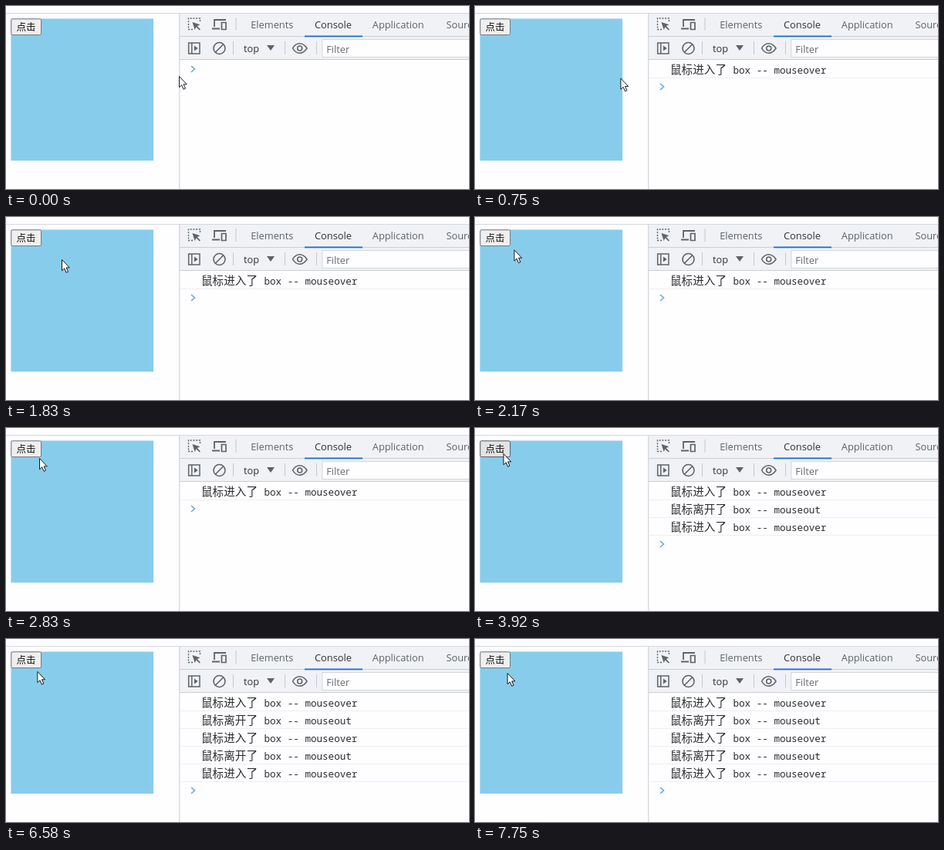
These frames come from a looping animation (600x238 px, 8000 ms). An HTML page with a canvas:

```html
<!DOCTYPE html>
<html lang="zh">
<head>
<meta charset="utf-8">
<title>mouseover</title>
<style>
html, body { margin: 0; width: 100%; height: 100%; overflow: hidden; background: #fefdff; }
canvas { display: block; width: 600px; height: 238px; }
</style>
</head>
<body>
<canvas id="stage"></canvas>
<script>
const W = 600, H = 238, LOOP = 8000, FPS = 12;
const canvas = document.getElementById('stage');
const ctx = canvas.getContext('2d');
const ratio = window.devicePixelRatio || 1;
canvas.width = W * ratio;
canvas.height = H * ratio;
ctx.scale(ratio, ratio);

const UI = '12.8px "Open Sans", "Noto Sans", sans-serif';
const MONO = '12.6px "Noto Sans Mono", "DejaVu Sans Mono", monospace';
const cjk = size => `${size}px "Noto Sans CJK SC", "Noto Sans CJK", sans-serif`;

// Pointer path: tick, x, y
const path = [
  [3, 224, 91], [13, 160, 95], [15, 154, 93], [22, 72, 55], [23, 65, 51],
  [29, 43, 38], [30, 43, 38], [31, 43, 41], [33, 43, 41], [34, 43, 39],
  [39, 36.5, 31], [46, 36.5, 31], [47, 36.5, 33], [75, 36.5, 33],
  [76, 36.5, 34], [80, 41, 43], [92, 41, 43], [93, 41.6, 44]
];
const ENTER_BOX = 9, ENTER_BUTTON = 35, LEAVE_BUTTON = 78;
const over = ['鼠标进入了', 'box -- mouseover'];
const out = ['鼠标离开了', 'box -- mouseout'];
const logs = [
  [ENTER_BOX, over],
  [ENTER_BUTTON, out], [ENTER_BUTTON, over],
  [LEAVE_BUTTON, out], [LEAVE_BUTTON, over]
];

function slope(i, axis) {
  const a = path[i], b = path[i + 1];
  return a && b ? (b[axis] - a[axis]) / (b[0] - a[0]) : 0;
}

// Harmonic mean of the neighbouring slopes keeps the curve monotone
function tangent(i, axis) {
  const a = slope(i - 1, axis), b = slope(i, axis);
  return a * b > 0 ? 2 * a * b / (a + b) : 0;
}

function pointerAt(tick) {
  const last = path.length - 1;
  if (tick <= path[0][0]) return path[0].slice(1);
  if (tick >= path[last][0]) return path[last].slice(1);
  const i = path.findIndex(k => k[0] > tick) - 1;
  const a = path[i], b = path[i + 1], span = b[0] - a[0];
  const s = (tick - a[0]) / span, s2 = s * s, s3 = s2 * s;
  return [1, 2].map(axis =>
    a[axis] + (b[axis] - a[axis]) * (3 * s2 - 2 * s3) +
    span * (tangent(i, axis) * (s3 - 2 * s2 + s) + tangent(i + 1, axis) * (s3 - s2)));
}

function rect(x, y, w, h, color) {
  ctx.fillStyle = color;
  ctx.fillRect(x, y, w, h);
}

function text(str, x, y, font, color) {
  ctx.font = font;
  ctx.fillStyle = color;
  ctx.fillText(str, x, y);
}

function stroke(d, color, width = 1.6) {
  ctx.strokeStyle = color;
  ctx.lineWidth = width;
  ctx.stroke(new Path2D(d));
}

function fill(d, color) {
  ctx.fillStyle = color;
  ctx.fill(new Path2D(d));
}

function drawPage(hover) {
  rect(6.4, 16.5, 184.7, 184.6, '#87cdeb');
  ctx.beginPath();
  ctx.roundRect(6.8, 16.8, 38.8, 20.8, 2);
  ctx.fillStyle = hover ? '#e3e3e4' : '#efefef';
  ctx.fill();
  ctx.strokeStyle = hover ? '#5c5c5c' : '#747678';
  ctx.lineWidth = 1;
  ctx.stroke();
  text('点击', 13.6, 32, cjk(12.5), '#111');
}

function drawIcons() {
  const gray = '#5f6368';
  // Inspect
  ctx.setLineDash([2, 1.7]);
  stroke('M242 30.5H236.5V16H251.5V21', gray, 1.4);
  ctx.setLineDash([]);
  fill('M241.5 21L251.5 24.3L247.8 26L252 30.4L250.8 31.6L246.4 27.3L244.7 31Z', gray);
  // Devices
  stroke('M270 27V18H285M267 29.5H277', gray, 1.8);
  stroke('M279.5 21.5H285V30.5H279.5Z', gray, 1.7);
  // Sidebar
  stroke('M236.7 48H251V62H236.7ZM240.8 48V62', gray, 1.5);
  fill('M244 51.5L248.7 55L244 58.5Z', gray);
  // Clear
  stroke('M284 55A7.5 7.5 0 1 1 269 55A7.5 7.5 0 1 1 284 55M271.3 60.2L281.7 49.8', gray);
  // Context menu
  fill('M338 51H348L343 58Z', gray);
  // Eye
  stroke('M371.5 55Q375 48.8 380.5 48.8T390 55Q386 61.2 380.5 61.2T371.5 55Z', gray, 1.5);
  stroke('M383.7 55A3 3 0 1 1 377.7 55A3 3 0 1 1 383.7 55', gray, 1.6);
}

function drawToolbars() {
  rect(0, 9, W, 1, '#d5d8dc');
  rect(225, 10, W - 225, 59, '#f0f2f5');
  rect(225, 39, W - 225, 1, '#cbced2');
  rect(225, 69, W - 225, 1, '#cbced2');
  rect(224.3, 10, 1, H - 10, '#c9ccd0');

  for (const [x, y] of [[297.5, 15], [294, 46], [361, 46], [402, 46]]) {
    rect(x, y, 1, 17, '#c6c9cd');
  }
  rect(409.4, 43, W - 409, 24, '#d3d6da');
  rect(410.4, 44, W - 410, 22, '#fefdff');

  const gray = '#5f6368', dark = '#303338';
  text('Elements', 317.2, 28.5, UI, gray);
  text('Console', 400, 28.5, UI, dark);
  text('Application', 474.8, 28.5, UI, gray);
  text('Sources', 570.5, 28.5, UI, gray);
  rect(387, 38.5, 75, 1.8, '#1a6ccc');
  text('top', 308, 59.5, UI, dark);
  text('Filter', 415.2, 60.5, UI, '#6a6d71');
  drawIcons();
}

function drawConsole(rows) {
  rows.forEach(([, [chinese, latin]], i) => {
    const y = 87.5 + 23 * i;
    text(chinese, 253, y + 0.5, cjk(14.6), '#2b2d30');
    text(latin, 334.5, y, MONO, '#2b2d30');
    rect(225, y + 5.5, W - 225, 1, '#eeeff1');
  });
  const y = 82 + 23 * rows.length;
  stroke(`M240 ${y - 4}L244.5 ${y}L240 ${y + 4}`, '#6ea6e3', 1.6);
}

function drawPointer([x, y]) {
  ctx.save();
  ctx.translate(x, y);
  const arrow = 'M0.5 0.5V14.8L3.7 11.8L6.1 17.3L8.5 16.2L6.1 10.9H10.3Z';
  fill(arrow, '#fff');
  stroke(arrow, '#16181c', 1);
  ctx.restore();
}

function draw(ms) {
  const tick = Math.floor((ms + 4) * FPS / 1000);
  rect(0, 0, W, H, '#fefdff');
  drawPage(tick >= ENTER_BUTTON && tick < LEAVE_BUTTON);
  drawToolbars();
  drawConsole(logs.filter(([start]) => tick >= start));
  drawPointer(pointerAt(tick));
}

const start = performance.now();
function frame() {
  draw((performance.now() - start) % LOOP);
  requestAnimationFrame(frame);
}
frame();
</script>
</body>
</html>
```
